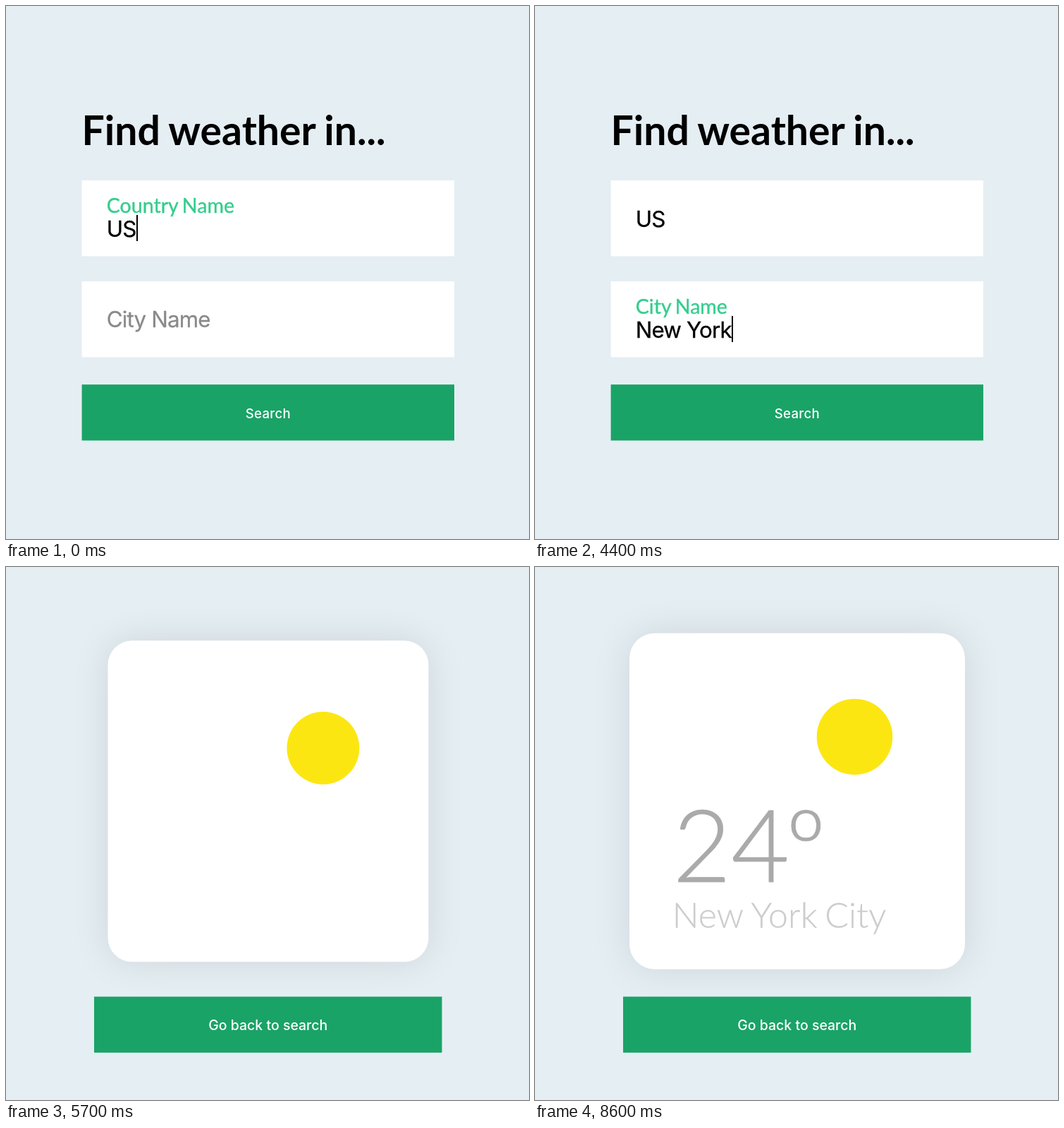
Animation of 742x755 px, one loop 8.7 s. Source, as an HTML page with a canvas:

```html
<!DOCTYPE html>
<html lang="en">
<head>
<meta charset="utf-8">
<title>Weather search</title>
<style>
html, body { margin: 0; width: 100%; height: 100%; overflow: hidden; background: #e5eef3; }
canvas { display: block; }
</style>
</head>
<body>
<canvas id="stage" width="742" height="755"></canvas>
<script>
const ctx = document.getElementById('stage').getContext('2d');
const LOOP = 8700, STEP = 100;
const BACK = '#e5eef3', GREEN = '#1aa367', MINT = '#34cd8d';
const LATO = 'Lato, sans-serif', INTER = 'Inter, sans-serif';
const HEADING = { font: `bold 57.1px ${LATO}`, gap: -2.5 };
const INPUT = { font: `31.3px ${INTER}`, spacing: -0.85, weight: 0.3 };
const LABEL = { font: `28.56px ${LATO}`, color: MINT, gap: -2.2, weight: 0.4 };
const DEGREES = { font: `300 142.8px ${LATO}`, color: '#aaa', weight: 0.9 };
const PLACE = { font: `300 50px ${LATO}`, color: '#ccc', gap: -2.9, weight: 0.3 };

// Time at which each typed character appears
const CITY = 'New York';
const KEYS = [1900, 2100, 2300, 2700, 3100, 3700, 4000, 4300];

const clamp = v => Math.max(0, Math.min(1, v));
const ramp = (t, start, length) => clamp((t - start) / length);
const mix = (a, b, p) => a + (b - a) * p;
const wave = p => (1 - Math.cos(Math.PI * p)) / 2;

function rect(x, y, w, h, color) {
  ctx.fillStyle = color;
  ctx.fillRect(x, y, w, h);
}

function setType({ font, spacing = 0, gap = 0, align = 'left' }) {
  ctx.font = font;
  ctx.letterSpacing = spacing + 'px';
  ctx.wordSpacing = gap + 'px';
  ctx.textAlign = align;
}

// weight: extra outline that thickens the strokes slightly
function text(str, x, y, style) {
  const { color = '#000', alpha = 1, weight = 0 } = style;
  if (alpha <= 0) return;
  setType(style);
  ctx.globalAlpha = alpha;
  ctx.fillStyle = ctx.strokeStyle = color;
  ctx.fillText(str, x, y);
  if (weight) {
    ctx.lineWidth = weight;
    ctx.strokeText(str, x, y);
  }
  ctx.globalAlpha = 1;
}

function caret(str, y, alpha) {
  setType(INPUT);
  const x = Math.round(143 + ctx.measureText(str).width);
  rect(x, y, 2, 37, `rgba(0,0,0,${alpha})`);
}

function button(label, x, y, w, size, spacing) {
  rect(x, y, w, 79.3, GREEN);
  text(label, x + w / 2, y + 47.3,
    { font: `500 ${size}px ${INTER}`, color: '#fff', spacing, align: 'center' });
}

function drawForm(t) {
  const swap = ramp(t, 300, 300);
  const blur = ramp(t, 5000, 300);
  const typed = CITY.slice(0, KEYS.filter(k => t >= k).length);

  text('Find weather in...', 107.5, 197, HEADING);

  rect(107.6, 247, 528.4, 107.4, '#fff');
  text('Country Name', 142.8, 292.5, { ...LABEL, alpha: 1 - swap });
  text('US', 142.8, mix(327, 313, swap), INPUT);
  if (t < 400) caret('US', 296, 1);

  rect(107.6, 390, 528.4, 107.4, '#fff');
  if (t < 400) text('City Name', 142.8, 455, { ...INPUT, color: '#8a8a8a' });
  text('City Name', 142.8, 435.5, { ...LABEL, alpha: swap * (1 - blur) });
  text(typed, 142.8, mix(470, 456, blur), INPUT);
  caret(typed, 439, ramp(t, 1500, 300) * (1 - ramp(t, 4500, 300)));

  button('Search', 107.6, 536.2, 528.4, 18.6, 0.3);
}

function drawResult(t) {
  const scale = wave(ramp(t, 5315, 445));
  const alpha = ramp(t, 5900, 800);
  const sunY = mix(253, 239.3, wave(Math.max(0, t - 5750) / 2400));

  if (scale > 0) {
    ctx.save();
    ctx.translate(372, 331.8);
    ctx.scale(scale, scale);
    ctx.translate(-372, -331.8);

    ctx.shadowColor = 'rgba(0,0,0,0.1)';
    ctx.shadowBlur = 54 * scale;
    ctx.fillStyle = '#fff';
    ctx.beginPath();
    ctx.roundRect(134, 93.8, 476, 476, 35.7);
    ctx.fill();
    ctx.shadowColor = 'transparent';

    ctx.fillStyle = '#fce612';
    ctx.beginPath();
    ctx.arc(453.5, sunY, 53.8, 0, Math.PI * 2);
    ctx.fill();

    text('24', 195.5, 446, { ...DEGREES, alpha });
    text('º', 355.5, 446, { ...DEGREES, alpha });
    text('New York City', 194.8, 510.5, { ...PLACE, alpha });
    ctx.restore();
  }
  button('Go back to search', 125, 608.6, 493.5, 19.5, 0);
}

function frame(now) {
  const t = Math.floor((now % LOOP) / STEP) * STEP;
  rect(0, 0, 742, 755, BACK);
  if (t < 5300) drawForm(t);
  else drawResult(t);
  requestAnimationFrame(frame);
}
requestAnimationFrame(frame);
</script>
</body>
</html>
```
